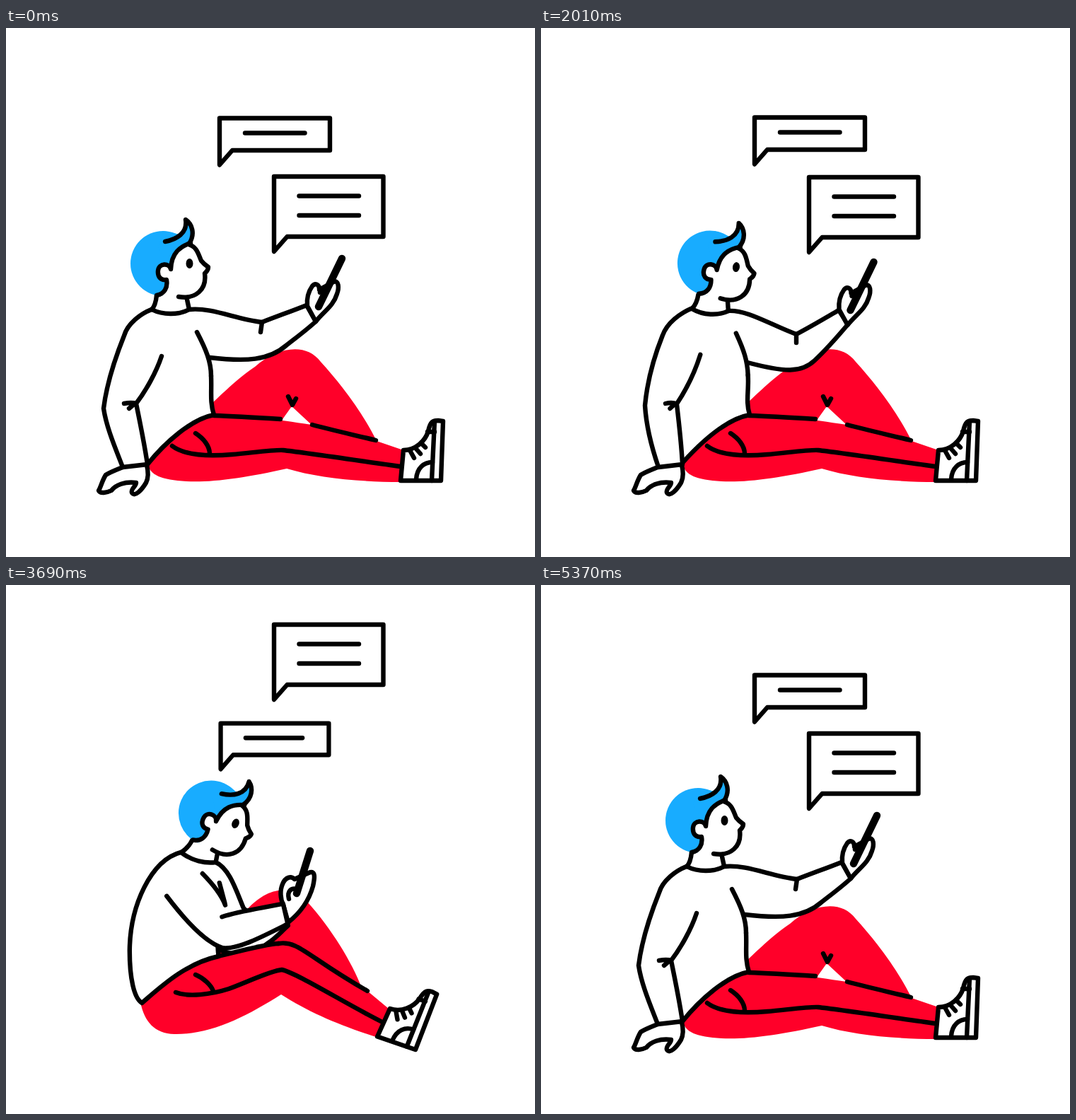
An HTML page for the animation above (5400 ms loop, 748x748 px).

```html
<!DOCTYPE html>
<html lang="en">
<head>
<meta charset="utf-8">
<title>Chatting</title>
<style>
  html, body { margin: 0; width: 100%; height: 100%; overflow: hidden; background: #fff; }
  svg { display: block; width: 100vw; height: 100vh; }
  .ink { fill: none; stroke: #000; stroke-width: 6.4; stroke-linecap: round; stroke-linejoin: round; }
  .paper { fill: #fff; }
  .red { fill: #ff0029; }
  .blue { fill: #18acff; }
  #phone { stroke-width: 10.5; }
</style>
</head>
<body>
<svg viewBox="0 0 748 748">
  <g id="small" class="ink">
    <path class="paper" d="M-78 -33H78V12.5H-60L-78 33Z"/>
    <path class="line" d="M-42 -12H43"/>
  </g>
  <g id="big" class="ink">
    <path class="paper" d="M-77.5 -53H77V32H-59L-77.5 53Z"/>
    <path class="line" d="M-42 -25.5H42"/>
    <path class="line" d="M-42 2H42"/>
  </g>
  <path id="backLeg" class="red"/>
  <path id="knee" class="ink"/>
  <path id="farArm" class="ink paper"/>
  <path id="frontLeg" class="red"/>
  <g class="ink">
    <path id="thigh"/>
    <path id="shin"/>
    <path id="seam"/>
    <path id="pocket"/>
  </g>
  <g id="shoe" class="ink"></g>
  <path id="torso" class="ink paper"/>
  <path id="chest" class="ink"/>
  <path id="farCrease" class="ink"/>
  <g id="phoneHand" class="ink">
    <path id="grip" class="paper"/>
    <path id="finger"/>
    <path id="phone"/>
  </g>
  <path id="floorHand" class="ink paper" d="M165 621C155 625 147 628 141 632C136 640 134 649 131 654C133 659 143 657 149 654C155 646 168 641 184 643C184 648 176 652 178 657C182 664 192 653 198 643C202 635 201 626 199 618"/>
  <path id="nearArm" class="ink paper"/>
  <path id="nearCrease" class="ink"/>
  <path id="neck" class="ink paper"/>
  <g id="head">
    <g transform="translate(-259 -333)">
      <circle class="blue" cx="222" cy="333" r="46"/>
      <path class="blue" d="M222 287L245 292C253 287 256 280 254 271C262 277 268 290 261 303L230 335L215 310Z"/>
      <path class="paper" d="M261 303C246 309 234 318 233 341C232 332 216 330 215 343C214 353 220 357 228 356C229 367 224 376 213 378L244 381C268 384 283 370 282 348L287 339L277 329C275 316 272 307 261 303Z"/>
      <g class="ink">
        <path d="M225 302C241 299 257 290 254 271C263 277 268 291 259 305"/>
        <path d="M261 304C246 309 234 318 233 341C231 332 216 332 215 343C214 353 220 357 227 356C229 367 224 376 213 378"/>
        <path d="M258 306C270 309 272 320 276 329C279 333 283 336 286 338C286 343 283 345 281 347C284 369 269 384 244 380"/>
      </g>
      <ellipse cx="259.5" cy="333" rx="5" ry="7"/>
    </g>
  </g>
</svg>
<script>
const LOOP = 5400;
const $ = id => document.getElementById(id);
const ease = k => (1 - Math.cos(Math.PI * k)) / 2;

// Blend two strings of the same structure, number by number.
function mix(a, b, k) {
  if (k === 0) return a;
  const to = b.match(/-?[\d.]+/g);
  let i = 0;
  return a.replace(/-?[\d.]+/g, n => String(+(+n + (to[i++] - n) * k).toFixed(2)));
}

// Poses: 0 leaning back, 1 leaning in, 2 half way, 3 knees up, 4 bending, 5 hunched.
const fullSet = (back, lean, up, hunch, half, bend) =>
  [back, lean, half || mix(back, lean, .53), up, bend || mix(up, hunch, .6), hunch];
const pair = (a, b) => fullSet(a, a, b, b);

const paths = {
  backLeg: pair(
    "M292 530C315 508 335 490 352 479C385 450 425 445 445 472C475 505 505 545 524 584L432 561L404 535L389 556L294 550",
    "M300 524C310 490 325 470 338 462C365 430 400 420 425 447C460 485 490 535 503 570L420 515L400 508L385 508L302 524"),
  knee: pair("M399 521L405 533L410 524", "M400 508L400 508L400 508"),
  frontLeg: pair(
    "M200 617C225 586 262 553 294 547C340 548 380 553 432 561C470 568 500 578 524 584L562 597L558 642C500 642 440 636 397 623C340 636 290 643 255 641C220 639 203 632 201 617",
    "M190 590C225 565 260 535 300 525C350 515 380 504 400 506C420 510 480 555 511 574L541 599L526 640C470 622 430 605 389 579C340 610 290 636 238 635C210 634 196 618 190 590"),
  thigh: pair("M294 548C320 549 355 551 388 553", "M300 525C330 518 365 508 385 507"),
  shin: pair("M433 561C455 567 490 575 523 583", "M385 507C413 502 425 525 511 574"),
  seam: pair(
    "M235 591C252 604 285 606 320 603C345 601 380 596 392 597C420 600 500 612 558 620",
    "M240 576C258 583 290 579 315 571C340 562 375 545 390 544C410 548 480 592 532 618"),
  pocket: pair("M268 573C279 580 288 591 288 602", "M268 551C280 556 290 566 293 574"),
  torso: fullSet(
    "M206 398C175 410 160 460 160 500C160 550 185 600 200 617C225 586 262 553 294 547C288 528 291 515 290 492",
    "M220 395C190 405 172 460 172 500C172 550 190 600 200 613C227 586 262 553 296 547C290 528 297 510 295 490",
    "M224 382C190 395 170 450 170 505C170 550 178 588 194 597C225 565 260 535 300 525C297 515 297 508 297 503",
    "M263 375C215 385 179 455 178 525C178 560 183 582 191 587C215 570 250 535 301 525C301 515 300 510 302 505"),
  chest: fullSet(
    "M290 492C290 472 283 455 270 430",
    "M295 490C294 470 290 455 281 433",
    "M295 434C288 428 275 418 258 405",
    "M320 465C316 446 306 428 291 410"),
  farArm: fullSet(
    "M260 398C292 395 325 412 362 416C385 407 405 400 425 392L438 415C425 427 410 438 396 449C372 470 340 472 288 466",
    "M270 402C298 400 330 422 365 436C385 423 405 409 422 397L435 417C422 434 405 455 390 473C372 490 350 491 296 474",
    "M275 389C298 396 312 430 325 452C340 470 370 470 388 462L397 478C385 490 375 500 362 508C345 525 318 522 297 506",
    "M311 394C328 404 335 435 343 460C350 470 370 470 390 470L400 484C390 492 385 500 375 506C350 525 320 524 303 522",
    "M264 400C292 398 325 420 361 433C382 422 402 410 421 399L434 419C418 438 403 455 387 470C368 488 345 487 292 473"),
  farCrease: fullSet("M362 416L360 430", "M365 436L365 449", "M285 417L295 434", "M313 424L319 460", "M361 433L361 445"),
  nearArm: fullSet(
    "M220 464C212 488 197 514 184 531C190 560 196 590 200 617L165 621C155 595 142 565 138 538C142 505 155 465 167 435C172 418 190 404 206 398",
    "M230 460C222 487 210 513 199 532C200 560 201 590 200 617L167 621C159 595 155 565 155 530C158 490 168 455 176 435C184 415 204 402 220 395",
    "M214 447C240 468 275 495 305 503C330 507 365 490 396 475L390 447C365 451 330 455 303 459C303 459 303 459 303 459C303 459 303 459 303 459",
    "M236 435C252 465 284 512 308 520C325 522 365 500 400 482L393 453C365 460 330 465 307 476C307 476 307 476 307 476C307 476 307 476 307 476"),
  nearCrease: fullSet(
    "M184 531C178 529 172 530 167 531M181 532L174 538",
    "M199 532C193 529 188 530 184 531M196 532L190 538",
    "M305 503C305 503 305 503 305 503M305 503L305 503",
    "M308 520C308 520 308 520 308 520M308 520L308 520"),
  neck: fullSet(
    "M213 378C212 388 210 394 206 398C222 406 244 406 259 398L256 384",
    "M231 375C229 384 225 391 220 396C236 407 256 408 270 402L271 388",
    "M236 362C234 372 230 378 225 383C240 392 262 394 275 389L277 373",
    "M283 357C278 364 272 370 263 375C278 389 296 394 311 394L313 387"),
  grip: pair(
    "M426 393C425 382 428 372 433 365C437 360 443 362 443 370L463 359C471 356 471 368 468 376C463 393 450 400 438 415Z",
    "M390 448C386 440 385 428 389 419C393 409 401 407 406 412L426 403C437 398 434 413 432 422C427 440 416 458 397 473Z"),
  finger: pair("M444 374C446 373 448 372 451 370", "M398 440C395 428 402 424 409 426"),
  phone: pair("M442 394L475 326", "M409 432L428 372")
};

const transforms = {
  head: fullSet("translate(259 333) rotate(0)", "translate(283 338) rotate(10)",
    "translate(288 325) rotate(7)", "translate(347 348) rotate(36)",
    "translate(275.5 338) rotate(8.5)", "translate(324 337) rotate(23)"),
  phoneHand: fullSet("translate(0 0)", "translate(-3 4)", "translate(0 0)",
    "translate(3 6.5)", "translate(-4.5 5)", "translate(2 4)"),
  shoe: pair("translate(615 640) rotate(0)", "translate(579 657) rotate(19)"),
  floorHand: pair("translate(0 0)", "translate(210 -160)")
};

const poseKeys = [[0, 0], [650, 1], [1100, 1], [1800, 2], [2190, 2], [2850, 3],
  [3150, 3], [3690, 4], [4500, 5], [4880, 5], [5370, 0], [LOOP, 0]];

// Bubble keys: time, centre y, scale, drawn part of the text lines.
const bubbles = {
  small: { x: 380, keys: [[0, 160.5, 1, 1], [150, 159.5, 1, 1], [990, 167, 1, 1], [2010, 159.5, 1, 1],
    [2880, 160.5, 1, 1], [3090, 60, 0, 1], [3091, 266, 0, 0], [3150, 259.6, .28, 0], [3420, 232, 1.08, 0],
    [3690, 228, .98, .97], [3780, 228, 1, 1], [4080, 229, 1, 1], [4590, 155.5, 1, 1],
    [4680, 160.5, 1, 1], [LOOP, 160.5, 1, 1]] },
  big: { x: 456.5, keys: [[0, 263, 1, 1], [990, 270.5, 1, 1], [2010, 264, 1, 1], [2880, 263, 1, 1],
    [3150, 156.5, 1, 1], [3480, 98, 1, 1], [3690, 109, 1, 1], [4060, 108, 1, 1], [4400, 65, 0, 1],
    [4520, 300, 0, 0], [4680, 276.5, 1.14, 0], [4800, 265, .97, .3], [5000, 263, 1, 1], [LOOP, 263, 1, 1]] }
};

const shoeParts = [
  ["M-53 -43C-36 -43 -22 -56 -18 -70C-15 -84 -11 -85 -4 -85L3 -84L0 0L-57 0Z", "paper"],
  ["M-9 -84L-13 0"], ["M-19 -69L-9 -69"],
  ["M-43 -41L-38 -32M-36 -46L-29 -38M-28 -53L-22 -47"],
  ["M-35 -2C-34 -18 -24 -26 -12 -26"]
].map(([d, cls]) => {
  const el = document.createElementNS("http://www.w3.org/2000/svg", "path");
  if (cls) el.setAttribute("class", cls);
  $("shoe").append(el);
  return { el, d };
});

function segment(keys, t) {
  let i = 0;
  while (i < keys.length - 2 && t >= keys[i + 1][0]) i++;
  const from = keys[i], to = keys[i + 1];
  return { from, to, k: ease((t - from[0]) / (to[0] - from[0])) };
}

// The toe bends outwards in short taps while the legs rest.
function toeBend(t) {
  const tap = start => Math.sin(Math.PI * (t - start) / 500) ** 4;
  if (t < 1500) return 4 * tap(0);
  if (t > 3180 && t < 4680) return 3 * tap(3180);
  return 0;
}

function drawBubble(id, t) {
  const { x, keys } = bubbles[id];
  const { from, to, k } = segment(keys, t);
  const [, y, scale, drawn] = from.map((n, i) => n + (to[i] - n) * k);
  $(id).setAttribute("transform", `translate(${x} ${y}) scale(${scale})`);
  $(id).style.display = scale < .02 ? "none" : "";
  $(id).querySelectorAll(".line").forEach(line => {
    line.setAttribute("d", line.getAttribute("d").replace(/H.*/, "H" + (-42 + 84.5 * drawn)));
    line.style.display = drawn < .02 ? "none" : "";
  });
}

function draw(t) {
  const { from, to, k } = segment(poseKeys, t);
  const pose = set => mix(set[from[1]], set[to[1]], k);
  for (const id in paths) $(id).setAttribute("d", pose(paths[id]));
  for (const id in transforms) $(id).setAttribute("transform", pose(transforms[id]));

  const kneesUp = +pose(pair("0", "1"));
  $("floorHand").style.display = kneesUp < .5 ? "" : "none";
  $("knee").style.display = kneesUp < .9 ? "" : "none";

  const bend = toeBend(t);
  for (const { el, d } of shoeParts) {
    el.setAttribute("d", d.replace(/(-?\d+) (-?\d+)/g, (_, x, y) =>
      `${+x + bend * (Math.max(0, -y - 14) / 70) ** 2} ${y}`));
  }
  drawBubble("small", t);
  drawBubble("big", t);
}

function tick() {
  draw(performance.now() % LOOP);
  requestAnimationFrame(tick);
}
tick();
</script>
</body>
</html>
```
